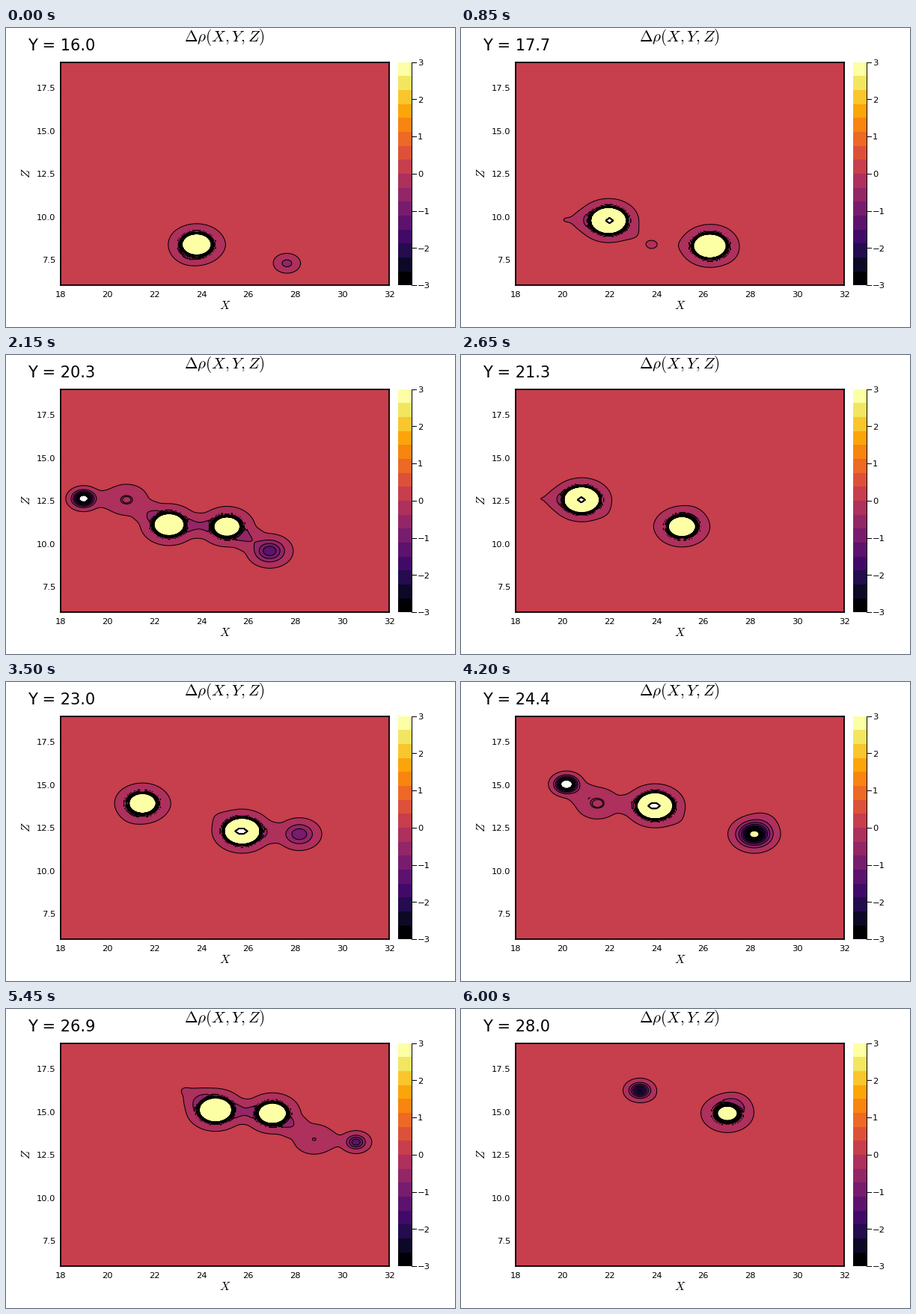
These frames come from a looping animation (600x400 px, 6050 ms). A matplotlib script:

```python
import itertools

import matplotlib.pyplot as plt
import numpy as np
from matplotlib.animation import FuncAnimation
from matplotlib.patches import Rectangle

plt.rcParams.update({"font.family": "DejaVu Sans", "mathtext.fontset": "cm"})

W, H = 600, 400
PT = 0.72  # points per pixel at 100 dpi
L, R, T, B = 73, 512, 45.6, 344.2
STEPS = 121

LEVELS = np.linspace(-3, 3, 17)
BANDS = [tuple(c) for c in plt.get_cmap("inferno")(np.linspace(0, 1, 16))]
FILL_LEVELS = [-9999, *LEVELS, 9999]
FILLS = ["white", *BANDS, BANDS[-1]]
BASE = 0.04

# Plane of the molecule: centre and two in-plane axes, one bond length each
CENTRE = np.array([23.28, 22.13, 12.44])
ACROSS = np.array([2.46, -0.26, -0.92])
ALONG = np.array([0.66, 2.235, 1.335])


def place(s, t):
    return CENTRE + s * ACROSS + t * (1 - 0.025 * s) * ALONG


def build():
    """Three fused hexagons; hydrogens sit on corners owned by one ring."""
    c = np.sqrt(3) / 2
    corners = {}
    for ring in ((0, 0), (c, 1.5), (c, -1.5)):
        for a in np.radians(np.arange(30, 390, 60)):
            out = np.array([np.cos(a), np.sin(a)])
            key = tuple(np.round(ring + out, 3))
            corners.setdefault(key, []).append(out)
    carbon, nitrogen, hydrogen = [], [], []
    for (s, t), outs in corners.items():
        if s > 1.7 and abs(t) < 1.1:
            nitrogen.append(place(s, t))
            continue
        carbon.append(place(s, t))
        if len(outs) == 1:
            hydrogen.append(place(s + 0.74 * outs[0][0], t + 0.74 * outs[0][1]))
    return carbon, nitrogen, hydrogen


CARBON, NITROGEN, HYDROGEN = build()
BONDS = [(p + q) / 2
         for p, q in itertools.combinations(CARBON + NITROGEN + HYDROGEN, 2)
         if np.linalg.norm(p - q) < 3]

XS = np.linspace(18, 32, 281)
ZS = np.linspace(6, 19, 261)


def shell(r, core, amp, decay, waves):
    """Steep core, damped ripple outside it, then a shallow negative halo."""
    d = np.maximum(r - core, 0)
    ripple = amp * np.exp(-d / decay) * np.cos(2 * np.pi * waves * d)
    halo = 0.33 * np.exp(-((r - core - 0.17) / 0.25)**2)
    return 100 * np.maximum(core - r, 0) + ripple - halo * (r > core)


def carbon_shell(r):
    return shell(r, 0.75, 5, 0.05, 13)


def nitrogen_shell(r):
    return shell(r, 0.67, -2.6, 0.12, 0)


def hydrogen_dip(r):
    return -5.6 * np.exp(-r**2 / 0.124)


def bond_dip(r):
    return -0.45 * np.exp(-r**2 / 0.22)


PARTS = ((bond_dip, BONDS), (hydrogen_dip, HYDROGEN),
         (carbon_shell, CARBON), (nitrogen_shell, NITROGEN))


def field(y, zs):
    X, Z = np.meshgrid(XS, zs)
    f = np.full(X.shape, BASE)
    for shape, centres in PARTS:
        for px, py, pz in centres:
            if abs(y - py) < 1.7:
                f += shape(np.sqrt((X - px)**2 + (y - py)**2 + (Z - pz)**2))
    # Sharp pit at each carbon nucleus, shaped by a 0.2 sampling grid
    for px, py, pz in CARBON:
        if abs(y - py) < 0.13:
            px = round(px, 1)
            gap = abs(px - round(px * 5) / 5)
            pit = np.maximum(abs(X - px) - gap, 0) + abs(Z - pz) - 0.16
            f = np.minimum(f, np.where(pit < 0.2, pit * 200, f))
    return f


fig = plt.figure(figsize=(W / 100, H / 100), dpi=100, facecolor="white")
page = fig.add_axes([0, 0, 1, 1])
page.set(xlim=(0, W), ylim=(H, 0))
page.axis("off")
ax = fig.add_axes([L / W, 1 - B / H, (R - L) / W, (B - T) / H], facecolor=BANDS[8])
ax.set(xlim=(18, 32), ylim=(6, 19), xticks=[], yticks=[])
ax.set_autoscale_on(False)
for side in ax.spines.values():
    side.set_linewidth(1.8 * PT)
    side.set_zorder(10)


def label(x, y, s, px, **kw):
    kw = {"ha": "center", "va": "baseline", **kw}
    return page.text(x, y, s, fontsize=px * PT, color="black", **kw)


for v in range(18, 33, 2):
    label(L + (v - 18) / 14 * (R - L), 360, str(v), 11.5)
for v in np.arange(7.5, 18, 2.5):
    label(66, B - (v - 6) / 13 * (B - T) + 4.3, f"{v:.1f}", 11.5, ha="right")

band = (B - T) / 16
for k, c in enumerate(BANDS):
    page.add_patch(Rectangle((524, B - (k + 1) * band), 18, band, fc=c, lw=0))
page.plot([542, 542], [T, B], color="black", lw=PT)
for v in range(-3, 4):
    ty = B - (v + 3) / 6 * (B - T)
    page.plot([542, 548], [ty, ty], color="black", lw=PT)
    label(550, ty + 4.3, str(v).replace("-", "\u2212"), 11.5, ha="left")

label(291.5, 18.2, r"$\Delta\rho(X, Y, Z)$", 21.1)
label(293, 376.5, "$X$", 16)
label(28, 194.5, "$Z$", 16, rotation=90, va="center")
caption = label(29.5, 30.5, "", 20.9, ha="left")

drawn = []


def draw(i):
    while drawn:
        drawn.pop().remove()
    y = 16 + i / 10
    caption.set_text(f"Y = {y:.1f}")
    # Only the band of heights that the tilted plane reaches
    mid = CENTRE[2] + 0.68 * (y - CENTRE[1])
    zs = ZS[abs(ZS - mid) < 4.2]
    f = field(y, zs)
    drawn.append(ax.contourf(XS, zs, f, levels=FILL_LEVELS, colors=FILLS))
    drawn.append(ax.contour(XS, zs, f, levels=LEVELS, colors="black",
                            linewidths=1.05 * PT, linestyles="solid"))
    return []


anim = FuncAnimation(fig, draw, frames=STEPS, interval=50, repeat=True,
                     repeat_delay=0, init_func=lambda: [], blit=False)
plt.show()
```
